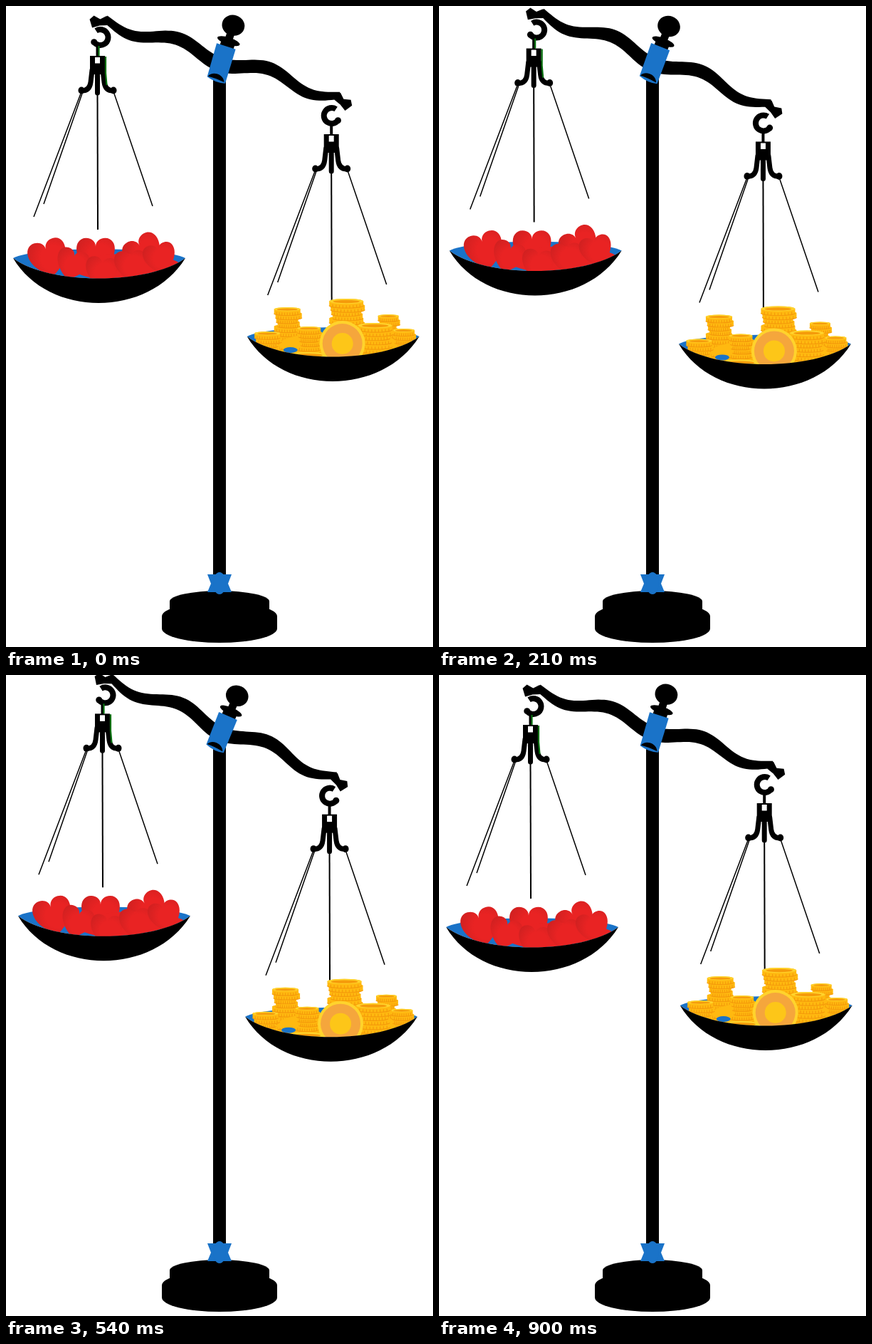
Write an HTML page with a canvas that moves like this. It is 600x900 px and loops after 0.93 s.

```html
<!DOCTYPE html>
<html lang="en">
<head>
<meta charset="utf-8">
<title>Balance scale</title>
<style>
html, body { margin: 0; width: 100%; height: 100%; overflow: hidden; background: #fff; }
canvas { display: block; }
</style>
</head>
<body>
<canvas id="stage" width="600" height="900"></canvas>
<script>
const ctx = document.getElementById('stage').getContext('2d');
const BLUE = '#1a73c8', RED = '#e92323', GOLD = '#ffb910', YELLOW = '#ffd32c', ORANGE = '#f59b0a';
const STEP = 30, LOOP = 930;
const REST_TILT = 0.317, SWING = 0.1;
const RIM = 'C60 392 200 392 252 354';

function fill(path, color = '#000') {
  ctx.fillStyle = color;
  ctx.fill(new Path2D(path));
}

function stroke(path, width, color = '#000') {
  ctx.strokeStyle = color;
  ctx.lineWidth = width;
  ctx.stroke(new Path2D(path));
}

function rect(x, y, w, h, color = '#000') {
  ctx.fillStyle = color;
  ctx.fillRect(x, y, w, h);
}

function ellipse(x, y, rx, ry, color = '#000') {
  ctx.fillStyle = color;
  ctx.beginPath();
  ctx.ellipse(x, y, rx, ry, 0, 0, 2 * Math.PI);
  ctx.fill();
}

function placed(x, y, draw) {
  ctx.save();
  ctx.translate(x, y);
  draw();
  ctx.restore();
}

function disc(y, rx, ry, height) {
  ellipse(300, y, rx, ry);
  rect(300 - rx, y, 2 * rx, height);
  ellipse(300, y + height, rx, ry);
}

function drawStand() {
  rect(291, 96, 18, 720);
  disc(836, 70, 15, 15);
  disc(857, 81, 20, 17);
  fill('M283 798H317L312 811 317 823H283L288 811Z', BLUE);
  ellipse(300, 810.5, 9, 15.5, BLUE);
}

// One arm in the level pose: a wave that gets thinner towards its tip.
function drawArm(side) {
  const length = 172;
  const middle = x => -11 + 8 * Math.cos(Math.PI * (x - 133) / 66);
  const half = x => 10 - 4.5 * (x / length) ** 2;
  ctx.save();
  ctx.scale(side, 1);
  ctx.fillStyle = '#000';
  ctx.beginPath();
  for (let x = 0; x <= length; x += 4) ctx.lineTo(x, middle(x) - half(x));
  for (let x = length; x >= 0; x -= 4) ctx.lineTo(x, middle(x) + half(x));
  ctx.fill();
  fill('M166-15 173-18 180-11 190-13 194-6 187 4 178-2 168-6Z');
  ctx.restore();
}

function drawBeam(angle) {
  placed(300, 85, () => {
    ctx.rotate(angle);
    drawArm(-1);
    drawArm(1);
    ellipse(0.4, -61, 16, 14.5);
    rect(-5, -50, 11, 12);
    ellipse(1, -38, 16.5, 5);
    rect(-9, -38, 20, 9);
    fill('M-14-30H14L15 20Q3 24-12 19Z', BLUE);
    fill('M-11 18C-8 9 9 8 13 19Q0 17-11 18Z');
  });
}

function drawHook(side) {
  const end = 0.65, r = 11;
  placed(130.75 - 1.75 * side, 44, () => {
    ctx.scale(side, 1);
    ctx.strokeStyle = '#000';
    ctx.lineWidth = 8;
    ctx.beginPath();
    ctx.arc(0, 0, r, -1, end, true);
    ctx.stroke();
    ellipse(r * Math.cos(end), r * Math.sin(end), 4.5, 4.5);
  });
}

function drawHanger() {
  stroke('M128.5 56V72', 4);
  rect(118, 70, 21, 26);
  rect(125, 72, 7, 8.5, '#fff');
  ctx.lineCap = 'round';
  for (const side of [-1, 1]) {
    placed(128.5, 0, () => {
      ctx.scale(side, 1);
      stroke('M7.5 90 9.5 107Q11 119 22 119', 7);
      ellipse(22.5, 118.5, 4.5, 5);
    });
  }
  stroke('M128.5 90V122', 7);
  ctx.lineCap = 'butt';
}

function drawStrings() {
  stroke('M105 123 39 296M107 123 53 278M152 123 206 281', 1.5);
  stroke('M128.5 124 129 314', 2);
}

function heart(x, y, size, turn) {
  const shade = ctx.createRadialGradient(0.2, 0.1, 0.55, 0.2, 0.1, 1.3);
  shade.addColorStop(0, RED);
  shade.addColorStop(1, '#cc2020');
  placed(x, y, () => {
    ctx.rotate(turn);
    ctx.scale(size, size);
    fill('M0 .9C-1.1 .3-1.05-.75-.43-.75-.18-.75 0-.58 0-.36 0-.58 .18-.75 .43-.75 1.05-.75 1.1 .3 0 .9Z', shade);
  });
}

function drawHearts() {
  [-0.28, 0, -0.5].forEach((turn, i) => heart(59 + 67 * i, 352 - 3 * i, 31, turn));
  ellipse(170, 367, 78, 19, RED);
  [361, 372, 363, 353].forEach((y, i) => heart(93 + 41 * i, y, 26, 0.3 - 0.18 * i));
}

function drawCoin(x, y, rx, height) {
  const flat = rx * 0.15;
  ctx.fillStyle = GOLD;
  ctx.beginPath();
  ctx.ellipse(x, y, rx, flat, 0, Math.PI, 0);
  ctx.ellipse(x, y + height, rx, flat, 0, 0, Math.PI);
  ctx.fill();
  ctx.strokeStyle = ORANGE;
  ctx.lineWidth = 1.2;
  ctx.beginPath();
  ctx.ellipse(x, y + height, rx, flat, 0, 0, Math.PI);
  for (let u = -0.8; u < 0.9; u += 0.2) {
    const edge = y + flat * Math.sqrt(1 - u * u);
    ctx.moveTo(x + rx * u, edge + 2);
    ctx.lineTo(x + rx * u, edge + height);
  }
  ctx.stroke();
}

// Coins pile up from the floor of the pan to the given top.
function stack(x, top, rx, floor = 376) {
  const height = 6, flat = rx * 0.15;
  const count = Math.ceil((floor - top) / height);
  for (let i = count - 1; i >= 0; i--) {
    const inset = i % 4 > 1 ? 3 : 0;
    drawCoin(x + (i % 2 ? 1 : -1), top + flat + i * height, rx - inset, height);
  }
  ellipse(x - 1, top + flat, rx, flat, YELLOW);
  ellipse(x - 1, top + flat + 0.4, rx * 0.78, flat * 0.6, ORANGE);
}

function drawCoins() {
  stack(67.5, 313, 18.5);
  stack(209.5, 323, 14.5);
  stack(150.5, 301, 24);
  ellipse(140, 365, 85, 17, GOLD);
  stack(39.5, 347, 18);
  stack(98, 340, 16.5);
  stack(231, 343, 15.5);
  stack(191, 335, 24);
  ellipse(71, 373, 10, 4, BLUE);
  stack(96, 376, 27, 382);
  ellipse(144, 364, 32, 32, YELLOW);
  ellipse(144, 364, 28, 28, '#f5a63c');
  ellipse(144, 364, 15, 15, '#fdc618');
}

function drawPan(side, drawLoad) {
  drawHook(side);
  drawStrings();
  drawHanger();
  if (side < 0) stroke('M130.5 56V70M140 71V94L141.5 111', 2.2, '#06700e');
  fill('M10 354C40 337 220 337 252 354' + 'C200 392 60 392 10 354Z', BLUE);
  ctx.save();
  ctx.clip(new Path2D('M10 354' + RIM + 'V250H10Z'));
  drawLoad();
  ctx.restore();
  fill('M10 354' + RIM + 'C200 438 60 438 10 354Z');
}

function swing(time) {
  const s = Math.sin(Math.PI * Math.floor(time % LOOP / STEP) / 30);
  return s * (0.82 + 0.18 * s);
}

function render(time) {
  const p = swing(time);
  rect(0, 0, 600, 900, '#fff');
  drawStand();
  drawBeam(REST_TILT + SWING * p);
  placed(7.4 * p, -16.6 * p, () => drawPan(-1, drawHearts));
  placed(328.7 - 2.8 * p, 110 + 16.6 * p, () => drawPan(1, drawCoins));
}

const start = performance.now();
function tick() {
  render(performance.now() - start);
  requestAnimationFrame(tick);
}
tick();
</script>
</body>
</html>
```
